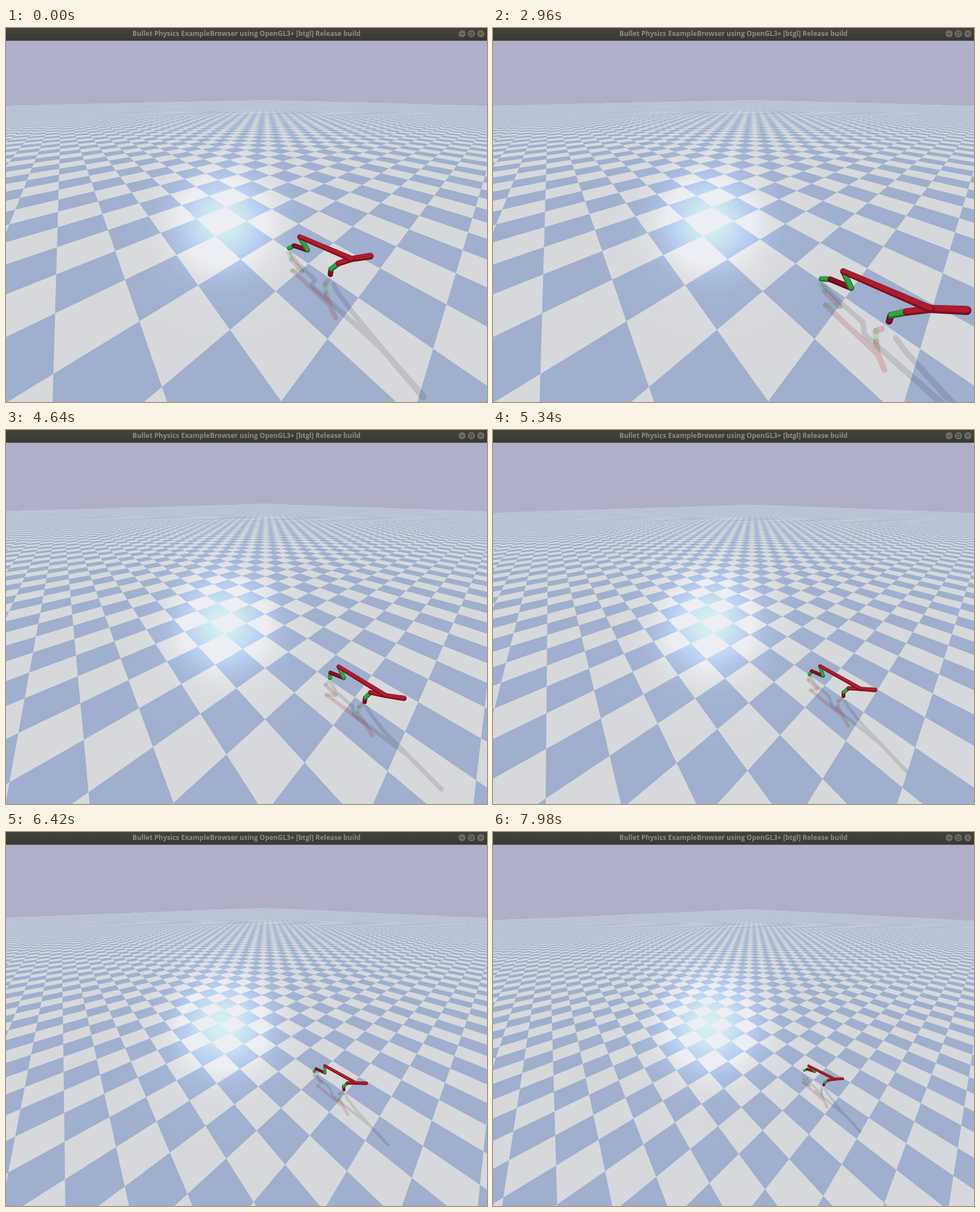
Write an HTML page with a canvas that moves like this. It is 849 px wide and 660 px high and loops after 8000 ms.

```html
<!DOCTYPE html>
<html lang="en">
<head>
<meta charset="utf-8">
<title>Cheetah simulation</title>
<style>
  html, body { margin: 0; width: 100%; height: 100%; overflow: hidden; background: #b0afc8; }
  canvas, svg { position: absolute; left: 0; top: 0; display: block; }
  text { font: 700 12px "Open Sans", "Noto Sans", sans-serif; fill: #8f8c83; }
</style>
</head>
<body>
<canvas id="scene" width="849" height="660"></canvas>
<svg width="849" height="23" viewBox="0 0 849 23">
  <defs>
    <linearGradient id="bar" x2="0" y2="1">
      <stop offset="0" stop-color="#43433e"/>
      <stop offset="1" stop-color="#393933"/>
    </linearGradient>
  </defs>
  <rect width="849" height="22.5" fill="url(#bar)"/>
  <text x="424.5" y="14" text-anchor="middle">Bullet Physics ExampleBrowser using OpenGL3+ [btgl] Release build</text>
  <g fill="#6c6a62" stroke="#3a3934">
    <circle cx="805" cy="10" r="7"/>
    <circle cx="821.5" cy="10" r="7"/>
    <circle cx="838" cy="10" r="7"/>
    <path fill="none" d="M802 10.5h6M819 7.5h5v5h-5zM835.5 7.5l5 5m0-5l-5 5"/>
  </g>
</svg>
<script>
const W = 849, H = 660, TOP = 22, CX = 424.5, CY = 341;
const LOOP = 8000, FOCAL = 319, RADIUS = 0.05, HALF_PLANE = 100;
const rad = deg => deg * Math.PI / 180;
const mix = (a, b, u) => a + (b - a) * u;
const SIN_PITCH = Math.sin(rad(35)), COS_PITCH = Math.cos(rad(35));
const SIN_YAW = Math.sin(rad(40)), COS_YAW = Math.cos(rad(40));
const SKY = [176, 175, 200], BLUE = [159, 175, 205], LIGHT = [214, 216, 219];
const BLUE_LIT = [212, 240, 240], LIGHT_LIT = [236, 238, 243];

const RED = ["#7c101c", "#ad1c30"], DARK_RED = ["#5f0c16", "#85121f"], GREEN = ["#226e2f", "#37a048"];

// Key strides; torso pitch and back thigh angle drive the whole body.
const STRIDES = [
  { time: 0, pitch: 9.5, thigh: -41 },
  { time: 2960, pitch: 12, thigh: -48 },
  { time: 3760, pitch: 6.5, thigh: -108 },
  { time: 4640, pitch: 0, thigh: -49 },
  { time: 6040, pitch: 8, thigh: -67 },
  { time: 7120, pitch: -1, thigh: -88 },
  { time: 7980, pitch: 8.5, thigh: -15 }
];

const ctx = document.getElementById("scene").getContext("2d");
const floor = ctx.createImageData(W, H);
let distance = 0, floorDistance = 0, shownTime = -1;

// The camera backs away in wheel clicks of 0.2.
const zoomAt = time => Math.min(10.4, Math.round((5 + Math.max(0, time - 3290) * 0.00127) * 5) / 5);

// Integral of a square wave of period 2, used to filter the checks.
const ramp = u => 1 - Math.abs(u - 2 * Math.floor(u / 2) - 1);
const wave = (u, w) => (ramp(u + w / 2) - ramp(u - w / 2)) / w;

function renderFloor() {
  const px = floor.data;
  for (let y = TOP; y < H; y++) {
    const up = CY - y - 0.5;
    const slope = FOCAL * SIN_PITCH - up * COS_PITCH;
    const ahead = up * distance / slope;
    const depth = distance + ahead * COS_PITCH;
    const dAhead = distance * FOCAL * SIN_PITCH / (slope * slope);
    for (let x = 0; x < W; x++) {
      const sx = (x + 0.5 - CX) / FOCAL, side = sx * depth;
      const a = side * SIN_YAW - ahead * COS_YAW, b = -side * COS_YAW - ahead * SIN_YAW;
      const o = (y * W + x) * 4;
      px[o + 3] = 255;
      if (slope <= 0 || Math.abs(a) > HALF_PLANE || Math.abs(b) > HALF_PLANE) {
        for (let c = 0; c < 3; c++) px[o + c] = SKY[c];
        continue;
      }
      const dSide = sx * COS_PITCH * dAhead, step = depth / FOCAL;
      const wa = Math.max(step * SIN_YAW, Math.abs(dSide * SIN_YAW - dAhead * COS_YAW));
      const wb = Math.max(step * COS_YAW, Math.abs(dSide * COS_YAW + dAhead * SIN_YAW));
      const blue = (1 + wave(a, wa) * wave(b, wb)) / 2;
      const r2 = (x - 383) ** 2 + (y - 342) ** 2;
      const glow = 50 * Math.exp(-r2 / 5900) + 3 * Math.exp(-r2 / 25000);
      for (let c = 0; c < 3; c++) {
        const lit = Math.min(BLUE[c] + glow * (1 + c * 0.25), BLUE_LIT[c]);
        const pale = Math.min(LIGHT[c] + glow, LIGHT_LIT[c]);
        px[o + c] = mix(pale, lit, blue);
      }
    }
  }
  floorDistance = distance;
}

function project(a, b, z) {
  const side = a * SIN_YAW - b * COS_YAW, ahead = -a * COS_YAW - b * SIN_YAW;
  const scale = FOCAL / (distance + ahead * COS_PITCH - z * SIN_PITCH);
  return { x: CX + side * scale, y: CY - (ahead * SIN_PITCH + z * COS_PITCH) * scale, r: RADIUS * scale };
}
const solid = p => project(p.a, 0, p.z);
const mirrored = p => project(p.a, 0, -p.z);
const shadow = p => project(p.a + 1.3 * p.z, 0.79 * p.z, 0);

function addCapsule(path, p, q, size, lift) {
  const t = Math.atan2(q.y - p.y, q.x - p.x), quarter = Math.PI / 2;
  const part = new Path2D();
  part.arc(p.x, p.y - p.r * lift, p.r * size, t + quarter, t + 3 * quarter);
  part.arc(q.x, q.y - q.r * lift, q.r * size, t - quarter, t + quarter);
  part.closePath();
  path.addPath(part);
}

function fillLimbs(limbs, view, color, size = 1, lift = 0) {
  const path = new Path2D();
  for (const limb of limbs) addCapsule(path, view(limb.from), view(limb.to), size, lift);
  ctx.fillStyle = color;
  ctx.fill(path);
}

// Limbs in drawing order: feet first, torso and head last.
function buildLimbs({ time, pitch, thigh }) {
  const limbs = [];
  const add = (from, angle, length, color) => {
    const to = { a: from.a + length * Math.cos(rad(angle)), z: from.z + length * Math.sin(rad(angle)) };
    limbs.unshift({ from, to, color });
    return to;
  };
  const rear = { a: 1.68 + 0.000376 * time - 0.0011 * (thigh + 45), z: 0.57 - 0.006 * pitch };
  const front = add(rear, pitch, 1, RED);
  add(front, pitch + 38.5, 0.3, RED);

  const backKnee = add(rear, thigh, 0.3, GREEN);
  const backHeel = add(backKnee, 0.18 * thigh - 154, 0.33, DARK_RED);
  add(backHeel, -78 - 5 * pitch, 0.18, GREEN);

  const frontKnee = add(front, 2.45 * pitch - 146, 0.28, RED);
  const frontHeel = add(frontKnee, -97 - 1.3 * pitch, 0.23, GREEN);
  add(frontHeel, -97 - 0.42 * thigh, 0.13, DARK_RED);
  return limbs;
}

// The simulation refreshes in discrete steps, so each pose is held until the next one.
function poseAt(time) {
  const next = STRIDES.findIndex(stride => stride.time > time);
  if (next < 0) return STRIDES[STRIDES.length - 1];
  const from = STRIDES[next - 1], to = STRIDES[next], span = to.time - from.time;
  const steps = Math.round(span / (time < 3500 ? 140 : 90));
  const u = Math.floor((time - from.time) / span * steps + 1e-6) / steps;
  return {
    time: mix(from.time, to.time, u),
    pitch: mix(from.pitch, to.pitch, u),
    thigh: mix(from.thigh, to.thigh, u)
  };
}

function draw(now) {
  const pose = poseAt(now);
  if (pose.time === shownTime) return;
  shownTime = pose.time;
  distance = zoomAt(pose.time);
  if (distance !== floorDistance) renderFloor();
  ctx.putImageData(floor, 0, 0);

  const limbs = buildLimbs(pose);
  const green = limbs.filter(limb => limb.color === GREEN);
  const red = limbs.filter(limb => limb.color !== GREEN);
  fillLimbs(red, mirrored, "rgba(165,30,30,0.18)");
  fillLimbs(green, mirrored, "rgba(60,160,70,0.18)");
  fillLimbs(limbs, shadow, "rgba(0,0,0,0.115)", 0.8);
  for (const limb of limbs) {
    fillLimbs([limb], solid, limb.color[0]);
    fillLimbs([limb], solid, limb.color[1], 0.68, 0.25);
  }
}

const start = performance.now();
function tick() {
  draw((performance.now() - start) % LOOP);
  requestAnimationFrame(tick);
}
tick();
</script>
</body>
</html>
```
